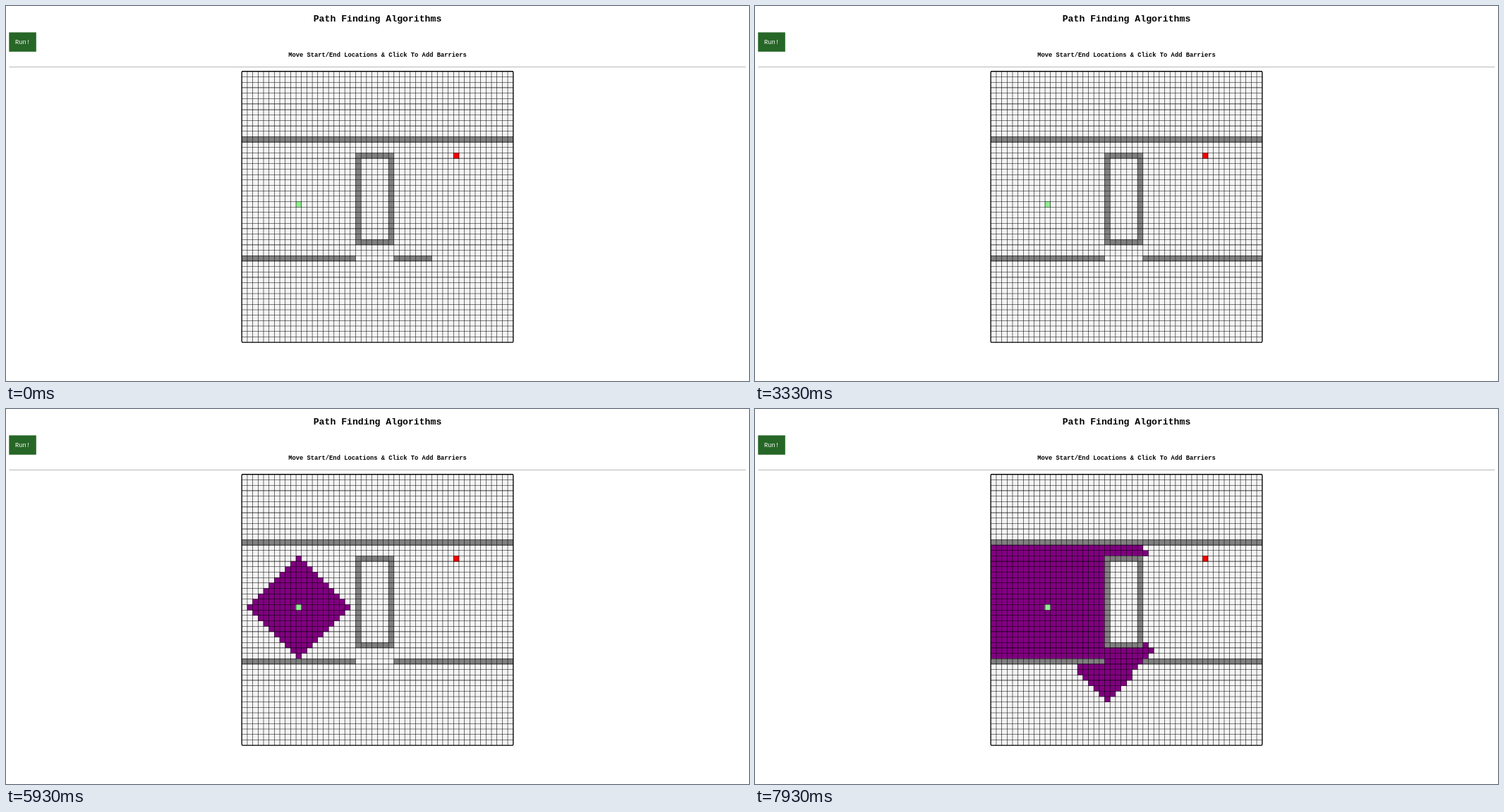
Write an HTML page with a canvas that moves like this. It is 1053 by 532 pixels and loops after 8 s.

```html
<!DOCTYPE html>
<html lang="en">
<head>
<meta charset="utf-8">
<title>Path Finding Algorithms</title>
<style>
  html, body { margin: 0; width: 100%; height: 100%; overflow: hidden; background: #fff; }
  svg, canvas { position: absolute; left: 0; top: 0; width: 1053px; height: 532px; }
  text { font-family: "Courier New", "Liberation Mono", monospace; font-size: 8.775px; text-anchor: middle; }
  .bold { font-weight: bold; }
  .title { font-size: 13.16px; }
  #button { fill: #266626; }
  #button.hover { fill: #151515; }
</style>
</head>
<body>
<svg viewBox="0 0 1053 532">
  <text class="bold title" x="526.5" y="22">Path Finding Algorithms</text>
  <rect id="button" x="4.3" y="37.4" width="38.5" height="27.4"/>
  <text x="23.6" y="53.6" fill="#fff">Run!</text>
  <text class="bold" x="526.5" y="72.3">Move Start/End Locations &amp; Click To Add Barriers</text>
  <rect x="4.4" y="86" width="1044.2" height="1" fill="#b8b8b8"/>
</svg>
<canvas id="grid" width="1053" height="532"></canvas>
<script>
const LOOP = 8000, FRAME = 1000 / 15;
// The grid is laid out on a 1920 x 971 page and scaled down to the stage.
const PAGE_W = 1920, PAGE_H = 971;
const SIZE = 50, CELL = 14.02, LEFT = 609, TOP = 169.37;
const START = { col: 10, row: 24 }, END = { col: 39, row: 15 };
const GAP_END = 28, DRAWN_FROM = 35;

const ctx = document.getElementById("grid").getContext("2d");
const button = document.getElementById("button");
ctx.scale(1053 / PAGE_W, 532 / PAGE_H);

const px = col => Math.round(LEFT + col * CELL);
const py = row => Math.round(TOP + row * CELL);
const steps = (from, to, count) =>
  Array.from({ length: count }, (_, i) => from + (to - from) * i / (count - 1));

// When each further barrier of the lower wall is added.
const barrierTimes = [1130, 1330, 1530, 1670, ...steps(1870, 2330, 5), ...steps(2530, 2870, 5), 3330];

// Search progress: [screen refresh, cells expanded].
const progress = [[77, 1], [89, 145], [98, 259], [110, 400], [119, 508]];

function isWall(col, row, lowerEnd) {
  if (row === 12) return true;
  if (row === 34) return col < 21 || (col >= GAP_END && col < lowerEnd);
  const inBox = col >= 21 && col <= 27 && row >= 15 && row <= 31;
  return inBox && (col === 21 || col === 27 || row === 15 || row === 31);
}

// Breadth-first search; stores how many expansions had happened when a cell was reached.
function search() {
  const reached = new Array(SIZE * SIZE).fill(Infinity);
  const queue = [START];
  reached[START.row * SIZE + START.col] = 0;
  for (let i = 0; i < queue.length; i++) {
    for (const [dx, dy] of [[0, -1], [0, 1], [-1, 0], [1, 0]]) {
      const col = queue[i].col + dx, row = queue[i].row + dy;
      if (col < 0 || row < 0 || col >= SIZE || row >= SIZE || isWall(col, row, SIZE)) continue;
      const id = row * SIZE + col;
      if (reached[id] < Infinity) continue;
      reached[id] = i + 1;
      queue.push({ col, row });
    }
  }
  return reached;
}
const reached = search();

function expandedAt(time) {
  const n = Math.floor((time + 4) / FRAME);
  if (n < progress[0][0]) return 0;
  for (let i = 1; i < progress.length; i++) {
    const [n0, k0] = progress[i - 1], [n1, k1] = progress[i];
    if (n <= n1) return Math.floor(k0 + (k1 - k0) * (n - n0) / (n1 - n0));
  }
  return progress[progress.length - 1][1];
}

function cellColor(col, row, lowerEnd, expanded) {
  if (col === START.col && row === START.row) return "#90ee90";
  if (col === END.col && row === END.row) return "#f00";
  if (isWall(col, row, lowerEnd)) return "#808080";
  return reached[row * SIZE + col] <= expanded ? "#800080" : null;
}

// Fills a block of cells together with the lines around it.
function fillCells(col, row, cols, rows, color) {
  const x = px(col), y = py(row);
  ctx.fillStyle = color;
  ctx.fillRect(x, y, px(col + cols) - x + 1, py(row + rows) - y + 1);
}

function drawLines() {
  const width = px(SIZE) - px(0) + 1, height = py(SIZE) - py(0) + 1;
  ctx.beginPath();
  for (let i = 0; i <= SIZE; i++) {
    ctx.rect(px(i), py(0), 1, height);
    ctx.rect(px(0), py(i), width, 1);
  }
  ctx.fillStyle = "#000";
  ctx.fill();
  ctx.lineWidth = 2;
  ctx.beginPath();
  ctx.roundRect(px(0), py(0), width, height, 3);
  ctx.stroke();
}

function draw(time) {
  const lowerEnd = DRAWN_FROM + barrierTimes.filter(t => time >= t).length;
  const expanded = expandedAt(time);
  button.classList.toggle("hover", time >= 4730 && time < 5400);

  ctx.clearRect(0, 0, PAGE_W, PAGE_H);
  fillCells(0, 0, SIZE, SIZE, "#f5f5f5");
  for (let row = 0; row < SIZE; row++) {
    for (let col = 0; col < SIZE; col++) {
      const color = cellColor(col, row, lowerEnd, expanded);
      if (color) fillCells(col, row, 1, 1, color);
    }
  }
  // Repaint the start cell so that its neighbours do not cover its edges.
  fillCells(START.col, START.row, 1, 1, "#90ee90");
  drawLines();
}

function tick() {
  draw(performance.now() % LOOP);
  requestAnimationFrame(tick);
}
tick();
</script>
</body>
</html>
```
